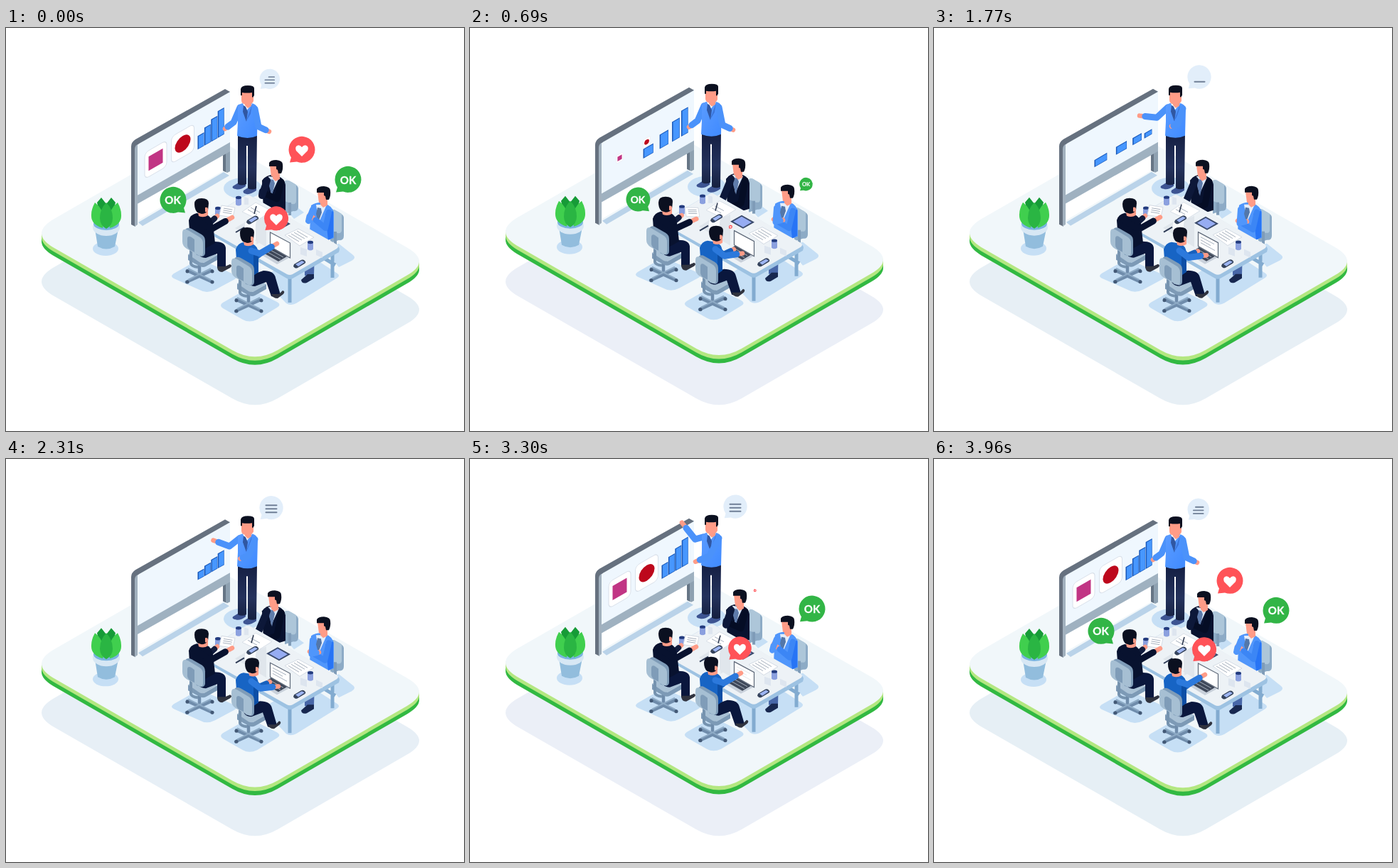
Recreate the animation shown at these times as an HTML page. Size 644x568 px, loop 3990 ms.

```html
<!DOCTYPE html>
<html lang="en">
<head>
<meta charset="utf-8">
<title>Team meeting</title>
<style>
html, body { margin: 0; width: 100%; height: 100%; overflow: hidden; background: #fff; }
svg { display: block; width: 644px; height: 568px; }
text { font: 700 15px Lato, "Open Sans", sans-serif; fill: #fff; stroke: #fff; stroke-width: .3; text-anchor: middle; }
.arm path { fill: none; stroke-linecap: round; stroke-linejoin: round; }
.skin { fill: #ff9c87; }
.hair { fill: #0b1020; }
.blue { fill: #5096fb; }
.navy { fill: #08122f; }
.shade { fill: #c6dff5; }
.ln { fill: none; stroke: #a6b0bd; stroke-width: 1; }
#sheet * { vector-effect: non-scaling-stroke; }
</style>
</head>
<body>
<svg viewBox="0 0 644 568">
  <defs>
    <path id="slab" d="M66 308 L318 453 Q350 471.5 382 453 L564 347.6 Q598 328 564 308.4 L312 164 Q280 145.5 248 164 L66 268.9 Q34 288.5 66 308Z"/>
    <linearGradient id="trouser" x2="0" y2="1"><stop stop-color="#151f42"/><stop offset=".6" stop-color="#24325c"/><stop offset="1" stop-color="#15203f"/></linearGradient>
    <linearGradient id="jacket" x2="1" y2="1"><stop stop-color="#5b9cff"/><stop offset="1" stop-color="#3f8aff"/></linearGradient>
    <g id="face">
      <path class="skin" d="M-4 6h9v9l-5 3-4-4z"/>
      <path class="skin" d="M-9-7h17v15q-2 5-8 5-9 0-9-6z"/>
      <path class="hair" d="M-10 0V-9q1-5 10-5t9 4V0l-2 3-1-1v-6q-7 1-14 0v4z"/>
    </g>
    <g id="side">
      <path class="skin" d="M-4 5h10v10l-6 3-4-4z"/>
      <path class="skin" d="M-8-4H6V9q-5 5-12 2z"/>
      <path class="hair" d="M-9-8q2-4 10-4 9 1 9 6 1 7-2 13H4l-1-5-2-1V-3h-10z"/>
    </g>
    <g id="back">
      <path class="skin" d="M-6 4H9v9q-6 4-13 1z"/>
      <path class="hair" d="M-10-3q0-8 10-8t10 7l-1 10q-3 5-9 5l-6-2q-4-4-4-12z"/>
      <path class="skin" d="M5 2q4-1 4 3t-4 3z"/>
    </g>
    <g id="base">
      <path d="M255 342l35 16M289 342l-35 16M272 325v23" fill="none" stroke="#6f8cab" stroke-width="4.5" stroke-linecap="round"/>
      <path d="M256 339l32 16M288 339l-32 16" stroke="#8daac5" stroke-width="2"/>
      <g fill="#435976"><circle cx="255" cy="343" r="2.5"/><circle cx="290" cy="343" r="2.5"/><circle cx="255" cy="358" r="2.5"/><circle cx="290" cy="358" r="2.5"/></g>
      <path d="M256 319l22 12 19-11v7l-16 9q-4 2-8 0l-17-9z" fill="#7d9ab6"/>
      <path d="M256 319l20-10 21 11-17 10q-4 2-8 0z" fill="#a9c1d5"/>
    </g>
    <g id="rest">
      <path d="M260 312v20q1 4 10 5" fill="none" stroke="#7693af" stroke-width="4"/>
      <path d="M252 284q3-4 9-1l14 8q5 3 5 9v17q0 4-4 5l-8-2z" fill="#7f9cb8"/>
      <path d="M248 289q0-8 8-4l15 9q6 3 6 10v13q0 7-7 3l-16-9q-6-4-6-10z" fill="#a6bfd3"/>
      <path d="M255 296q1-4 6-1l4 3v18l-6-3q-4-3-4-7z" fill="#7f9cb8"/>
    </g>
    <g id="rear">
      <path d="M392 216q3-3 9 1 10 5 10 9v26q0 7-7 6l-12 4z" fill="#8dabc6"/>
      <path d="M392 216q3-3 9 1l7 4v23q0 5-6 4l-10-4z" fill="#adc6d9"/>
      <path d="M399 246v18" stroke="#7f9cb8" stroke-width="4"/>
    </g>
    <g id="cup">
      <path d="M-4-5V5q4 3 8 0V-5z" fill="#8ba0df"/><ellipse cy="-5" rx="4" ry="2.2" fill="#233b7e"/>
    </g>
    <g id="phone">
      <path d="M-8 2L2-4q2-1 4 0l2 2q1 2-1 3L-3 7q-2 1-4 0l-2-2z" fill="#35435c"/>
      <path d="M-6 2L3-3l4 2-9 6z" fill="#9db5f2"/>
    </g>
    <path id="bubble" d="M-18.5 0A18.5 18.5 0 1 1-7 17L-17 18-15 11Q-18.5 6-18.5 0Z"/>
    <path id="heart" d="M0 9l-8-8q-2-5 1-7 4-2 7 2 3-4 7-2 3 2 1 7z" fill="#fff"/>
  </defs>

  <use id="shadow" href="#slab" y="69"/>
  <g id="scene">
    <g fill="#32b942"><use href="#slab" y="12.5"/><use href="#slab" y="9.5"/></g>
    <g fill="#b4e781"><use href="#slab" y="6.5"/><use href="#slab" y="3.5"/></g>
    <use href="#slab" y="1" fill="#f1f7fa"/>

    <g class="shade">
      <ellipse cx="333" cy="226" rx="27" ry="15"/>
      <ellipse cx="140" cy="311" rx="18" ry="10"/>
      <path d="M236 346l30-17q6-4 14 0l40 18q8 4 0 8l-26 14q-12 6-22 0l-36-16q-6-3 0-7z"/>
      <path d="M305 387l30-17q6-4 14 0l32 16q7 4 0 8l-28 17q-11 5-20 0l-28-16q-6-4 0-8z"/>
      <path d="M360 352l60-36 46 30q4 3 0 6l-58 36q-8 4-14 0z"/>
      <path d="M446 310l22-6 20 16q5 4-2 8l-18 9z"/>
      <path d="M392 254l19 0 8 6-14 9z"/>
    </g>

    <!-- Whiteboard -->
    <path d="M186 274L306 203l8 5-122 71z" fill="#bad3e9"/>
    <path d="M186 247L306 178v23L186 271z" fill="#fff"/>
    <path d="M305 172h10v30l-4 2-6-3z" fill="#8ea1b1"/><path d="M305 172h4v31l-4-2z" fill="#667585"/>
    <path d="M181 166q0-4 4-6L315 88v75L181 240z" fill="#eff7fe"/>
    <path d="M181 238L315 161v13L181 250z" fill="#9fb1c0"/>
    <path d="M176 167q0-6 6-10L308 86l7 4-128 73q-5 3-5 9v108l-6-3z" fill="#66717f"/>
    <path d="M181 171q0-5 4-7v113l-4 3z" fill="#a2b1be"/>
    <g id="bars" transform="matrix(1 -.577 0 1 0 325.8)"></g>
    <g id="cardA"><rect x="-15.5" y="-18.5" width="31" height="37" rx="6" fill="#fff" stroke="#d9e0ea"/><rect x="-10" y="-10" width="20" height="20" fill="#c13584"/></g>
    <g id="cardB"><rect x="-16" y="-19" width="32" height="38" rx="6" fill="#fff" stroke="#d9e0ea"/><circle r="11" fill="#bd081c"/></g>

    <!-- Plant -->
    <path d="M125 283l4 25q12 7 24 0l5-25z" fill="#92bddd"/>
    <ellipse cx="141" cy="281" rx="19" ry="12" fill="#d7e7f4"/>
    <ellipse cx="141" cy="276" rx="18" ry="9" fill="#79b4e0"/>
    <path d="M128 246l6-7 7 9 7-9 6 7-7 24h-13z" fill="#169b37"/>
    <path d="M125 246q16 12 11 36-17-5-16-19 0-8 5-17zM157 246q-16 12-11 36 17-5 16-19 0-8-5-17z" fill="#40cf4e"/>
    <path d="M141 246q9 9 9 22 0 10-9 15-9-5-9-15 0-13 9-22z" fill="#2ab543"/>

    <!-- Presenter -->
    <path d="M319 223l8-5h10v5q-8 6-14 4-6-1-4-4zM334 229l8-5h10v5q-8 6-14 5-6-1-4-5z" fill="#3d5492"/>
    <path d="M326 149h27l-1 77q-5 3-12 0V166h-2v54q-6 3-12 0z" fill="url(#trouser)"/>
    <g id="pL" class="arm"></g>
    <path d="M326 110q4-4 8-4h11q8 1 9 9l-1 37q-13 6-28 0l1-20z" fill="url(#jacket)"/>
    <path d="M333 106l4 12 9-11z" fill="#fff"/><path d="M334 109l3 2 3 7-2 14-5-14z" fill="#3057a2"/>
    <path d="M338 130l8-22-2 13-6 10z" fill="#3b76db"/>
    <use href="#face" x="340" y="95"/>
    <g id="pR" class="arm"></g>

    <!-- Far side of the table -->
    <use href="#rear"/>
    <path d="M360 215q6-8 15-8 16 2 18 14v36q-14 6-31 0z" class="navy"/>
    <path d="M369 209l4 26 11-24z" fill="#dce8f6"/><path d="M371 213l5 1 2 5-4 18-4-14z" fill="#5f7cab"/>
    <use id="bHead" href="#side"/>
    <g id="bR" class="arm"></g><g id="bL" class="arm"></g>
    <use href="#rear" transform="translate(64 41)"/>
    <path d="M420 312h14l-1 36-13 1z" fill="#4867a8"/><path d="M415 355l9-8h9v6l-10 6q-7 2-8-4z" fill="#182850"/>
    <path d="M429 250q6-4 13-4 16 2 19 14v36l-14 5-20-13z" class="blue"/>
    <path d="M449 262l11-4v37l-7 4z" fill="#2774f5"/>
    <path d="M436 249l4 25 11-25z" fill="#e4eefb"/><path d="M438 253l5 1 1 6-5 14-3-12z" fill="#5377a9"/>
    <use href="#side" x="446" y="235"/>
    <g id="cR" class="arm"></g><g id="cL" class="arm"></g>

    <!-- Table -->
    <path d="M443 322l20 12M459 318v34M399 344v43" stroke="#82abd0" stroke-width="5"/>
    <path d="M274 273L336 236.5q4-2.5 8 0L465 306q4 3 4 6l-1 4-65 37q-4 2-8 0L274 283z" fill="#9dc2e2"/>
    <path d="M274 273L336 236.5q4-2.5 8 0L465 305q4 3 0 6l-62 36q-4 2-8 0L274 279q-4-3 0-6z" fill="#edf2f6"/>
    <path d="M322 282l20-12 24 14v25zM352 271l14-6v33l-14 7z" fill="#e0e6ec"/>
    <path d="M336 275l15-8v32l-15-8z" fill="#f8fafc"/>
    <path d="M335 238l6 2v9h-6zM414 309l9 3v10l-9-3zM436 312l9 4v8l-9-4z" fill="#dde5ef"/>
    <path d="M332 259l19-13 23 12-19 12z" fill="#fff" stroke="#d9e0e8"/>
    <path class="ln" d="M340 256l13 7M344 253l13 7"/>
    <path d="M392 292l19-9 22 12-20 12z" fill="#fff" stroke="#d4dbe4"/>
    <path class="ln" d="M397 292l15 9M401 290l15 9M405 288l15 9M409 286l15 9"/>
    <path d="M366 275l16-9 18 10-16 9z" fill="#3a4a6b"/><path d="M370 275l12-7 14 8-12 7z" fill="#96acf2"/>
    <path d="M323 288l12-7" stroke="#2d3a55" stroke-width="2"/>
    <use href="#cup" x="327" y="244"/><use href="#cup" x="298" y="259"/><use href="#cup" x="428" y="307"/>
    <use href="#phone" x="347" y="269"/><use href="#phone" x="413" y="331"/>
    <path d="M358 319l15-11 27 15-19 10z" fill="#c8d0da"/><path d="M362 317l11-8 22 13-12 7z" fill="#3f4859"/>
    <path class="ln" d="M366 315l20 11M370 312l20 11" stroke-width=".7"/>
    <path d="M371.5 288l28 15v21l-28-16z" fill="#fff" stroke="#5d6878" stroke-width="1.2"/>
    <path id="screen" class="ln" d="M375 295l19 10M375 299l14 8M375 303l20 11"/>
    <path id="pen" d="M-1 8l3-11" stroke="#26324a" stroke-width="1.5"/>

    <!-- Near side, left -->
    <use href="#base"/>
    <g id="aR" class="arm"></g>
    <path d="M268 309l25-8q15 0 16 9v26q-6 5-12 2v-20l-16 6q-12 0-13-15z" fill="#0a173d"/>
    <path d="M297 336h11l7-3q4 2 0 5l-11 6q-7 0-7-8z" fill="#30333f"/>
    <path d="M257 271q2-8 11-10l14 2q7 3 9 13l3 27-18 10-17-12z" class="navy"/>
    <use href="#back" x="275" y="251"/>
    <g id="sheet"><rect width="1" height="1" fill="#fff" stroke="#d4dbe4"/><path class="ln" d="M.2 .25h.65M.2 .45h.65M.2 .65h.65"/></g>
    <g id="aL" class="arm"></g>
    <use href="#rest"/>

    <!-- Near side, right -->
    <use href="#base" transform="translate(69 41)"/>
    <g id="dR" class="arm"></g>
    <g id="dLegs">
      <path d="M338 350l24-8q15 0 17 10l7 24q-6 5-13 2l-7-20-16 6q-12 0-13-15z" fill="#0a173d"/>
      <path d="M373 375h11l5-5q4 1 1 5l-8 6q-7 0-9-6z" fill="#30333f"/>
    </g>
    <path d="M323 312q3-9 11-10l12 2q8 3 9 13v27l-16 8-14-12z" fill="#1764c4"/>
    <path d="M348 310q7 4 7 13v21l-7 5z" fill="#0d4fa6"/>
    <use id="dHead" href="#back"/>
    <g id="dL" class="arm"></g>
    <use href="#rest" transform="translate(69 41)"/>

    <!-- Bubbles -->
    <g id="chat"><use href="#bubble" fill="#e2eefa" transform="translate(373 69.5) scale(.9)"/>
      <g id="lines" fill="none" stroke="#6f7f96" stroke-width="2" stroke-linecap="round"><path/><path/><path/></g></g>
    <g id="heart1"><use href="#bubble" x="416" y="171.5" fill="#ff5358"/><use href="#heart" x="416" y="172"/></g>
    <g id="heart2"><use href="#bubble" fill="#ff5358" transform="translate(380 268.5) scale(.92)"/><use href="#heart" x="380" y="269"/></g>
    <g id="okR"><use href="#bubble" x="481" y="213.5" fill="#32b546"/><text x="481" y="219.5">OK</text></g>
    <g id="okL"><use href="#bubble" fill="#32b546" transform="translate(235 242.5) scale(-1 1)"/><text x="234.5" y="248">OK</text></g>
  </g>
</svg>
<script>
const LOOP = 3990, STEP = 30;
const $ = id => document.getElementById(id);
const set = (el, attrs) => { for (const k in attrs) el.setAttribute(k, attrs[k]); };
const move = (id, x, y, s = 1) => set($(id), { transform: `translate(${x} ${y}) scale(${s})` });

const ease = u => (1 - Math.cos(Math.PI * Math.min(1, Math.max(0, u)))) / 2;
const ramp = (t, from, to) => ease((t - from) / (to - from));
const mix = (a, b, u) => a.map((v, i) => v + (b[i] - v) * u);
const since = (t, from) => (t - from + LOOP) % LOOP;

// 0 to 1 from time "on", back to 0 from time "off", across the loop's seam.
function shown(t, on, off, dur = 240) {
  return since(t, on) < since(off, on)
    ? ease(since(t, on) / dur)
    : 1 - ease(since(t, off) / dur);
}

// Arms: the elbow follows part of the hand's way from its first place.
const arm = (color, width, shoulder, elbow, ...hands) => ({ color, width, shoulder, elbow, hands });
const arms = {
  pL: arm("#4b92fa", 9, [329, 112], [320, 133], [308, 142], [308, 152], [289, 124], [298, 92]),
  pR: arm("#4b92fa", 9, [350, 114], [355, 139], [370, 146], [361, 158], [334, 139], [317, 147]),
  bL: arm("#0d1839", 10, [367, 215], [360, 236], [361, 228], [346, 252]),
  bR: arm("#050d25", 9, [387, 217], [381, 241], [361, 232], [361, 257]),
  cL: arm("#5096fb", 8, [431, 256], [425, 272], [427, 263], [440, 273]),
  cR: arm("#3c86f5", 8, [454, 260], [449, 282], [429, 265], [427, 272]),
  aL: arm("#08122f", 9, [267, 271], [288, 284], [318, 267], [319, 282]),
  aR: arm("#111c3d", 8, [279, 268], [285, 276], [297, 265], [299, 270]),
  dL: arm("#2c79dc", 9, [345, 314], [357, 318], [381, 304], [383, 321]),
  dR: arm("#1760bd", 8, [348, 314], [351, 323], [357, 319], [371, 314])
};
for (const id in arms) {
  $(id).innerHTML = `<path stroke="#ff9c87" stroke-width="6.5"/><path stroke="${arms[id].color}" stroke-width="${arms[id].width}"/>`;
}

function handAt({ hands }, pose) {
  const i = Math.floor(pose) % hands.length;
  return mix(hands[i], hands[(i + 1) % hands.length], pose % 1);
}

function drawArm(id, [hx, hy]) {
  const { shoulder, elbow, hands } = arms[id];
  const bent = [elbow[0] + .35 * (hx - hands[0][0]), elbow[1] + .35 * (hy - hands[0][1])];
  const [skin, sleeve] = $(id).children;
  set(skin, { d: `M${mix(bent, [hx, hy], .8)}L${hx} ${hy}` });
  set(sleeve, { d: `M${shoulder}L${bent}L${mix(bent, [hx, hy], .68)}` });
}

// Bubbles: tail tip and the times of coming and going.
const bubbles = {
  chat: { x: 358, y: 86.5, on: 1140, off: 3870, dur: 480 },
  okR: { x: 464, y: 231.5, on: 2710, off: 570 },
  heart2: { x: 364, y: 285, on: 3090, off: 510 },
  heart1: { x: 399, y: 189.5, on: 3250, off: 240 },
  okL: { x: 252, y: 260.5, on: 3480, off: 645 }
};

const BARS = 4;
$("bars").innerHTML = '<rect fill="#1857b8"/><rect fill="#4797ff"/>'.repeat(BARS);

function drawBars(t) {
  const rects = $("bars").children;
  for (let i = 0; i < BARS; i++) {
    const apart = ramp(t, 510 + 40 * i, 960 + 40 * i);
    const together = ramp(t, 1570 - 50 * i, 2020 - 50 * i);
    const regrown = .53 * ramp(t, 1500 + 50 * i, 1835 + 50 * i) + .47 * ramp(t, 2850, 3150);
    const pack = 1 - apart + together;
    const height = (17 + 6.3 * i) * (1 - apart + regrown);
    const x = 195 + 28.7 * i + (75 - 19.3 * i) * pack, width = 23 - 15 * pack;
    set(rects[2 * i], { x: x - .5, y: -height - 1, width: width + 1, height: height + 2 });
    set(rects[2 * i + 1], { x: x + 1, y: -height + .2, width: width - 1, height });
  }
}

function drawCard(id, [x, y], s) {
  set($(id), { transform: `matrix(${s} ${-.577 * s} 0 ${s} ${x} ${y})` });
}

function draw(t) {
  const lift = (1 - Math.cos(4 * Math.PI * t / LOOP)) / 2;
  move("scene", 0, -3 * lift);
  set($("shadow"), { fill: `rgb(${230 + 6 * lift},239,${245 + 3 * lift})` });

  const work = shown(t, 330, 2880, 360);
  const flat = shown(t, 570, 1300, 330);
  const talk = ramp(t, 690, 1170) + ramp(t, 1230, 1740) + ramp(t, 2100, 2700) + ramp(t, 3420, 3930);
  const pose = { p: talk, a: flat, b: work, c: work, d: work };
  for (const id in arms) {
    const hand = handAt(arms[id], pose[id[0]]);
    if (id[0] === "d") hand[1] += work * Math.sin(t / 45 + (id === "dL" ? 2 : 0));
    drawArm(id, hand);
    if (id === "bL") move("pen", ...mix([350, 254], hand, work));
  }
  move("bHead", 379 - 2 * work, 198);
  move("dHead", 339 + 7 * work, 292);
  move("dLegs", -5 * work, 0);
  set($("screen"), { opacity: shown(t, 900, 3150) });
  set($("sheet"), { transform: `matrix(${mix([19, 3, -3, 14, 303, 250], [18, -6, 14, 10, 300, 268], flat)})` });

  drawBars(t);
  const aside = 1 - shown(t, 2670, 2000);
  drawCard("cardA", mix([210.5, 185.5], [229, 176], aside), shown(t, 2550, 540));
  drawCard("cardB", [248.5, 163], shown(t, 2770, 540));

  for (const id in bubbles) {
    const { x, y, on, off, dur } = bubbles[id], s = shown(t, on, off, dur);
    move(id, x * (1 - s), y * (1 - s), s);
  }
  [...$("lines").children].forEach((line, i) => {
    const length = 15 * shown(t, 2010 - 220 * i, (3885 + 120 * i) % LOOP);
    set(line, { d: length > .3 ? `M380.5 ${66 + 5 * i}h${-length}` : "" });
  });
}

const start = performance.now();
function tick() {
  const t = (performance.now() - start) % LOOP;
  draw(Math.floor(t / STEP) * STEP);
  requestAnimationFrame(tick);
}
tick();
</script>
</body>
</html>
```
